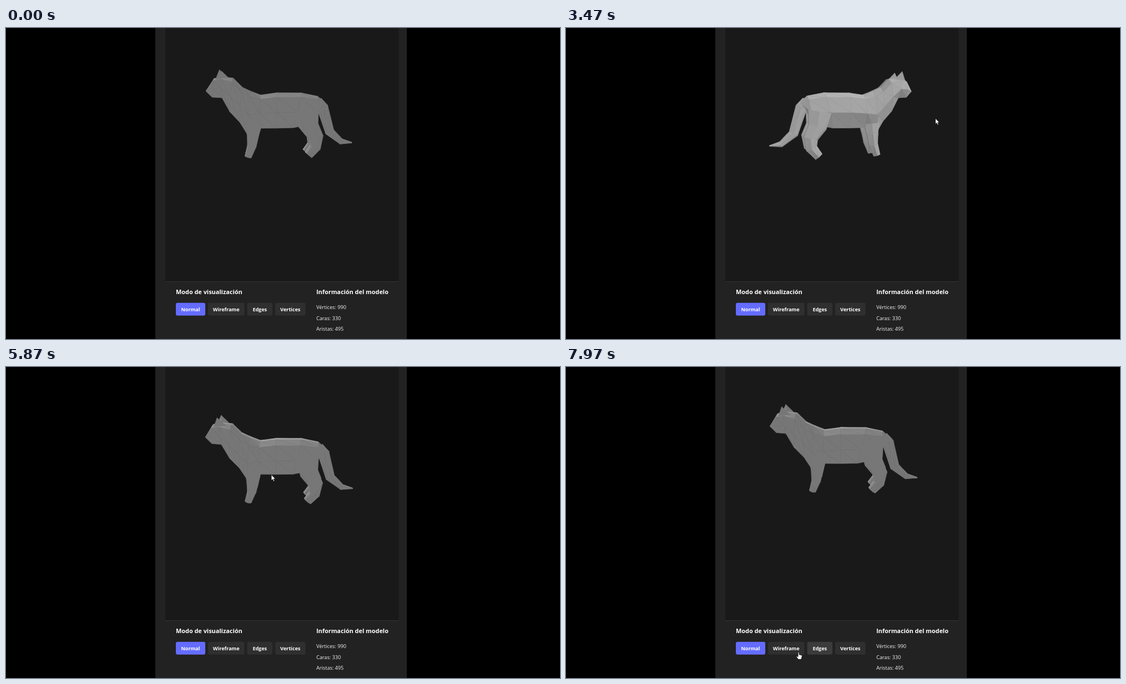
Recreate the animation shown at these times as an HTML page with a canvas. Size 998 by 561 pixels, loop 8000 ms.

```html
<!DOCTYPE html>
<html lang="es">
<head>
<meta charset="utf-8">
<style>
  html, body { margin: 0; width: 100%; height: 100%; overflow: hidden; background: #000; }
  svg, canvas { position: absolute; left: 0; top: 0; width: 998px; height: 561px; }
  text { font: 9.15px "Open Sans", "Noto Sans", sans-serif; fill: #f4f4f4; }
  .title { font-size: 10.9px; font-weight: 700; fill: #fff; }
  .label { font-size: 9px; font-weight: 700; text-anchor: middle; fill: #fff; }
</style>
</head>
<body>
<svg viewBox="0 0 998 561">
  <rect x="269" width="453" height="561" fill="#222"/>
  <rect x="287" width="420.5" height="457" fill="#191919"/>
  <rect x="287" y="457" width="420.5" height="1" fill="#333"/>
  <text class="title" x="306" y="480">Modo de visualización</text>
  <text class="title" x="559" y="480">Información del modelo</text>
  <g fill="#2f2f2f">
    <rect x="306" y="495.7" width="53" height="23" rx="3" fill="#646cff"/>
    <rect x="364" y="495.7" width="65.5" height="23" rx="3"/>
    <rect id="edges" x="434.5" y="495.7" width="45.5" height="23" rx="3"/>
    <rect x="485" y="495.7" width="54.5" height="23" rx="3"/>
  </g>
  <text class="label" x="332.5" y="511">Normal</text>
  <text class="label" x="396.7" y="511">Wireframe</text>
  <text class="label" x="457.2" y="511">Edges</text>
  <text class="label" x="512.2" y="511">Vertices</text>
  <text x="559" y="507">Vértices: 990</text>
  <text x="559" y="526.5">Caras: 330</text>
  <text x="559" y="546">Aristas: 495</text>
</svg>
<canvas></canvas>
<script>
const LOOP = 8000, CENTER_X = 497.5, CENTER_Y = 129, CAMERA = 560;
const LIGHT = [-0.4, -0.68, -0.61];
const canvas = document.querySelector('canvas');
const edgesButton = document.getElementById('edges');
const ctx = canvas.getContext('2d');
const ratio = window.devicePixelRatio || 1;
canvas.width = 998 * ratio;
canvas.height = 561 * ratio;

// Eased step from 0 to 1 between two times.
function glide(t, start, end) {
  const u = Math.min(1, Math.max(0, (t - start) / (end - start)));
  return u * u * (3 - 2 * u);
}

// Two drags to the right, one back to the left, then a pan down and up.
function pose(t) {
  const lift = glide(t, 6800, 7420);
  const panY = 179 * glide(t, 5700, 6750) - 186 * lift;
  return {
    yaw: 4 + 121 * glide(t, 1450, 2550) + 75 * glide(t, 2600, 3150) - 201 * glide(t, 3300, 5000),
    pitch: .2 * glide(t, 4300, 5100) + Math.max(0, panY) * .0012,
    panX: 8 * lift - 16 * Math.sin(Math.PI * glide(t, 5900, 6700)),
    panY
  };
}

function pointer(t) {
  const leave = glide(t, 7470, 7800);
  return {
    x: 496 + 104 * (1 - glide(t, 1370, 1450)) + 194 * glide(t, 1450, 2550)
      - 90 * glide(t, 2550, 2720) + 73 * glide(t, 2720, 3150) - 267 * glide(t, 3300, 5000)
      + 72 * glide(t, 5300, 5650) + 9 * glide(t, 6350, 6700)
      - 35 * leave - 37 * glide(t, 7780, 8020),
    y: 163 + 130 * (1 - glide(t, 1370, 1450)) + 22 * glide(t, 5300, 5650)
      + .735 * pose(t).panY + 334 * leave
  };
}

const faces = [];
const sub = (a, b) => a.map((v, i) => v - b[i]);
const dot = (a, b) => a[0] * b[0] + a[1] * b[1] + a[2] * b[2];
const mean = points => [0, 1, 2].map(i => points.reduce((s, p) => s + p[i], 0) / points.length);
const local = (x, y, z) => [x - CENTER_X, y - CENTER_Y, z];

function addFace(a, b, c, inside) {
  const u = sub(b, a), v = sub(c, a);
  const n = [u[1] * v[2] - u[2] * v[1], u[2] * v[0] - u[0] * v[2], u[0] * v[1] - u[1] * v[0]];
  const size = Math.hypot(...n);
  if (size < 1e-6) return;
  const flip = dot(n, sub(mean([a, b, c]), inside)) < 0 ? -1 : 1;
  const shade = Math.round(119 + 66 * Math.max(0, flip * dot(n, LIGHT) / size));
  faces.push({ points: [a, b, c], flip, color: `rgb(${shade},${shade},${shade})` });
}

// Half of a cross-section: position from one rim to the other, share of the half width.
const halfRing = [[0, .3], [.13, .85], [.55, 1], [1, .35]];
const ring = [...halfRing, ...halfRing.map(([u, z]) => [u, -z]).reverse()];

// Skin between two rims; widthAt gives the half width along the part.
function loft(rimA, rimB, widthAt, side = 0) {
  const last = rimA.length - 1;
  const rings = rimA.map(([x, y], i) => ring.map(([u, z]) => local(
    x + (rimB[i][0] - x) * u, y + (rimB[i][1] - y) * u, side + z * widthAt(i / last))));
  for (let i = 0; i < last; i++) {
    const a = rings[i], b = rings[i + 1], inside = mean([...a, ...b]);
    a.forEach((p, j) => {
      const k = (j + 1) % ring.length;
      addFace(p, a[k], b[j], inside);
      addFace(a[k], b[k], b[j], inside);
    });
  }
  const cap = rings[last], inside = mean(rings[0]);
  for (let j = 1; j + 1 < cap.length; j++) addFace(cap[0], cap[j], cap[j + 1], inside);
}

// A limb follows a few joints with a thickness rule.
function limb(joints, thicknessAt, widthAt, side) {
  const last = joints.length - 1;
  const rim = sign => joints.map(([x, y], i) => {
    const [ax, ay] = joints[Math.max(0, i - 1)], [bx, by] = joints[Math.min(last, i + 1)];
    const half = sign * thicknessAt(i / last) / 2 / Math.hypot(bx - ax, by - ay);
    return [x - (by - ay) * half, y + (bx - ax) * half];
  });
  loft(rim(1), rim(-1), widthAt, side);
}

function addEar(side) {
  const tip = local(388, 77.5, 17 * side), front = local(381, 94, 14 * side);
  const back = local(402, 91, 16 * side), inner = local(390, 89, 5 * side);
  const inside = mean([tip, front, back, inner]);
  addFace(tip, front, back, inside);
  addFace(tip, back, inner, inside);
  addFace(tip, inner, front, inside);
}

const backLine = [[574, 134], [561, 123], [531, 117], [487, 117], [459, 121], [441, 114],
  [426, 107], [410, 91], [390, 89], [377, 92], [363, 113]];
const bellyLine = [[560, 150], [553, 172], [517, 179.5], [487, 180], [456, 180], [435, 190],
  [422, 169], [405, 151], [391, 126], [374, 125], [363, 115]];
loft(backLine, bellyLine, u => 22 * (1 - ((2 * u - .9) / 1.15) ** 4));
limb([[561, 134], [571, 143], [584.5, 188], [606, 206], [625, 208]],
  u => 20 * (1 - u * u) + 1, u => 5 - 3.5 * u);
for (const side of [-15, 15]) {
  limb([[447, 172], [445.5, 190], [443.5, 210], [437, 229]],
    u => 28 * Math.exp(-.9 * u), () => 6, side);
  limb([[541, 150], [545, 176], [557, 196], [555, 213], [543, 227]],
    u => 40 * Math.exp(-u), () => 6, side);
  addEar(Math.sign(side));
}

function drawCat(t) {
  const { yaw, pitch, panX, panY } = pose(t);
  const angle = yaw * Math.PI / 180, zoom = 1 + .09 * pitch;
  const cy = Math.cos(angle), sy = Math.sin(angle), cp = Math.cos(pitch), sp = Math.sin(pitch);
  const project = ([x, y, z]) => {
    const depth = z * cy - x * sy, near = depth * cp - y * sp;
    const scale = zoom * CAMERA / (CAMERA - near);
    return [CENTER_X + panX + (x * cy + z * sy) * scale,
            CENTER_Y + panY + (y * cp + depth * sp) * scale, near];
  };
  const visible = [];
  for (const { points, flip, color } of faces) {
    const [a, b, c] = points.map(project);
    const area = (b[0] - a[0]) * (c[1] - a[1]) - (b[1] - a[1]) * (c[0] - a[0]);
    if (area * flip > 0) visible.push({ a, b, c, color, depth: a[2] + b[2] + c[2] });
  }
  visible.sort((p, q) => p.depth - q.depth);
  ctx.lineWidth = .6;
  ctx.lineJoin = 'round';
  for (const { a, b, c, color } of visible) {
    ctx.beginPath();
    for (const p of [a, b, c]) ctx.lineTo(p[0], p[1]);
    ctx.closePath();
    ctx.fillStyle = ctx.strokeStyle = color;
    ctx.fill();
    ctx.stroke();
  }
}

const arrow = new Path2D('M0 0V10.4L2.4 8.2L4 12L5.8 11.2L4.2 7.6H7.4Z');
const hand = new Path2D('M-1 1Q0-.6 1 1V5L5.4 6Q6.4 6.4 6.2 8L5.4 11.5L4.6 13.5H-.6L-3.6 9.4Q-4.4 8 -3.2 7.6L-1 9Z');

function drawPointer(t) {
  if (t < 1370) return;
  const { x, y } = pointer(t);
  const shape = y > 495 ? hand : arrow;
  ctx.save();
  ctx.translate(x, y);
  ctx.fillStyle = '#fff';
  ctx.strokeStyle = '#111';
  ctx.lineWidth = .8;
  ctx.fill(shape);
  ctx.stroke(shape);
  ctx.restore();
}

function draw() {
  const t = performance.now() % LOOP;
  const hover = glide(t, 7760, 7840) - .6 * glide(t, 7880, 8000);
  const level = Math.round(47 + 25 * hover);
  edgesButton.setAttribute('fill', `rgb(${level},${level},${level})`);
  ctx.setTransform(ratio, 0, 0, ratio, 0, 0);
  ctx.clearRect(0, 0, 998, 561);
  drawCat(t);
  drawPointer(t);
  requestAnimationFrame(draw);
}
draw();
</script>
</body>
</html>
```
